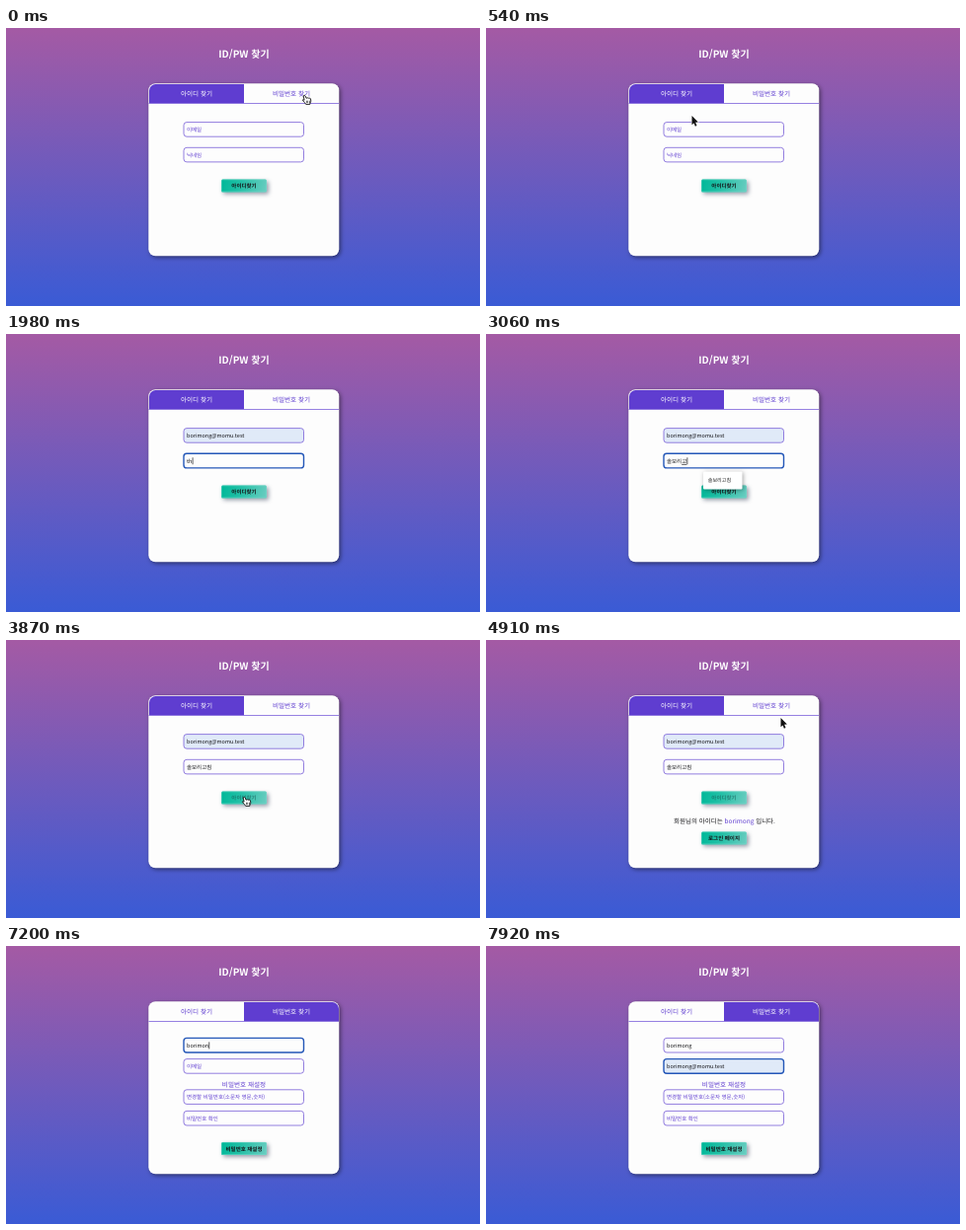
Recreate the animation shown at these times as an HTML page with a canvas. Size 480x282 px, loop 8000 ms.

```html
<!DOCTYPE html>
<html lang="ko">
<head>
<meta charset="utf-8">
<title>ID/PW 찾기</title>
<style>
  html, body { margin: 0; width: 100%; height: 100%; overflow: hidden; }
  canvas { display: block; width: 480px; height: 282px; }
</style>
</head>
<body>
<canvas id="stage"></canvas>
<script>
const W = 480, H = 282, LOOP = 8000;
const PURPLE = '#5f3dd0', INK = '#151518', BLUE = '#2457b8', FILLED = '#e0eaf8';
const ID = 'borimong', EMAIL = ID + '@momu.test', NICK = '솔보리고침';

const canvas = document.getElementById('stage');
const ctx = canvas.getContext('2d');
const scale = window.devicePixelRatio || 1;
canvas.width = W * scale;
canvas.height = H * scale;

// Each track is a list of [time, value] pairs; the value holds until the next time.
const emailTrack = [[0, ''], [1020, 'b'], [1120, 'bo'], [1220, 'bor'], [1500, EMAIL]];
const nickTrack = [[0, ''], [1800, 't'], [1920, 'th'], [2300, 't'], [2400, ''],
  [2520, 'ㅅ'], [2600, '소'], [2680, '솔'], [2760, '솔ㅂ'], [2820, '솔보'],
  [2900, '솔보리'], [2980, '솔보리ㄱ'], [3040, '솔보리고'], [3150, '솔보리고치'], [3240, NICK]];
const idTrack = [[0, ''], [6120, 'ㅠ'], [6280, 'ㅠㅐ'], [6580, 'ㅠ'], [6660, ''],
  ...[...ID].map((_, i) => [6760 + i * 70, ID.slice(0, i + 1)])];
const resetEmailTrack = [[0, ''], [7560, 'b'], [7640, 'bo'], [7780, EMAIL]];
const focusTrack = [[0, ''], [860, 'email'], [1680, 'nick'], [3840, ''],
  [5640, 'id'], [7400, 'resetEmail']];

// Pointer path: [time, x, y]
const path = [[50, 301, 68], [540, 208.5, 89], [780, 204, 102], [960, 204, 102],
  [3380, 215, 130], [3760, 240, 159], [4180, 240, 159], [4560, 338, 118],
  [4910, 298.5, 79], [5040, 291, 67], [5180, 291, 67], [5560, 214, 100], [5760, 214, 100]];

const between = (t, a, b) => t >= a && t < b;

function valueAt(track, t) {
  let value = track[0][1];
  for (const [start, v] of track) if (t >= start) value = v;
  return value;
}

function pointerAt(t) {
  if (t <= path[0][0]) return path[0].slice(1);
  for (let i = 1; i < path.length; i++) {
    const [t0, x0, y0] = path[i - 1], [t1, x1, y1] = path[i];
    if (t > t1) continue;
    const p = (t - t0) / (t1 - t0), e = p * p * (3 - 2 * p);
    return [x0 + (x1 - x0) * e, y0 + (y1 - y0) * e];
  }
  return path[path.length - 1].slice(1);
}

function text(str, x, y, size, color = INK, weight = 500, align = 'left') {
  ctx.font = `${weight} ${size}px "Noto Sans CJK KR", "Noto Sans CJK JP", "Noto Sans", sans-serif`;
  ctx.textAlign = align;
  ctx.fillStyle = color;
  ctx.fillText(str, x, y + size * 0.37);
  return ctx.measureText(str).width;
}

function box(x, y, w, h, r, fill, stroke, lineWidth = 1) {
  ctx.beginPath();
  ctx.roundRect(x, y, w, h, r);
  if (fill) { ctx.fillStyle = fill; ctx.fill(); }
  if (stroke) { ctx.strokeStyle = stroke; ctx.lineWidth = lineWidth; ctx.stroke(); }
}

function withShadow(color, blur, offset, draw) {
  ctx.save();
  ctx.shadowColor = color;
  ctx.shadowBlur = blur * scale;
  ctx.shadowOffsetX = ctx.shadowOffsetY = offset * scale;
  draw();
  ctx.restore();
}

function field(y, placeholder, value = '', focused = false, t = 0) {
  const filled = value === EMAIL;
  box(180, y, 121.5, 14.6, 3, filled ? FILLED : '#fdfdfd',
    focused ? BLUE : '#8770dc', focused ? 1.4 : 0.9);
  const mid = y + 7.6;
  if (!value) text(placeholder, 183, mid, 5.5, PURPLE);
  const width = value ? text(value, 183, mid, 5.5) : 0;
  if (!focused) return;
  ctx.fillStyle = INK;
  if (!filled) ctx.fillRect(183.3 + width, mid - 3.6, 0.7, 7);
  // Underline below the syllable being composed
  if (/[^\x00-\x7f]$/.test(value) && t !== 0) {
    const last = ctx.measureText(value.slice(-1)).width;
    ctx.fillRect(183 + width - last, mid + 3, last, 0.7);
  }
}

function button(label, y, color = INK) {
  const fill = ctx.createLinearGradient(219, y, 263, y + 13);
  fill.addColorStop(0, '#00b899');
  fill.addColorStop(0.4, '#20bfa5');
  fill.addColorStop(1, '#6accc0');
  withShadow('rgba(30,40,70,.45)', 4, 2, () => box(218, y, 46, 13, 1.5, fill));
  box(218.4, y + 0.4, 45.2, 12.2, 1.2, null, 'rgba(120,220,205,.65)', 0.8);
  text(label, 241, y + 6.6, 5.5, color, 600, 'center');
}

function popup(label, y) {
  withShadow('rgba(0,0,0,.35)', 4, 1, () => box(220, y, 39.5, 18, 1, '#fff'));
  ctx.save();
  ctx.beginPath();
  ctx.rect(220, y, 39.5, 18);
  ctx.clip();
  text(label, 224.7, y + 9, 5.1, '#222', 400);
  ctx.restore();
}

function tab(label, x, active, corners) {
  box(x, 57, 96, 19.3, corners, active ? PURPLE : '#fdfdfd');
  text(label, x + 48, 67, 6.6, active ? '#fff' : PURPLE, 500, 'center');
}

function drawCard(resetting) {
  const sky = ctx.createLinearGradient(0, 0, 0, H);
  sky.addColorStop(0, '#a45aa4');
  sky.addColorStop(1, '#3a5bd5');
  ctx.fillStyle = sky;
  ctx.fillRect(0, 0, W, H);
  text('ID/PW 찾기', 241, 26.5, 10, '#fff', 700, 'center');
  withShadow('rgba(0,0,0,.5)', 4, 1.5, () => box(144.3, 56.3, 193, 175, 7, '#fdfdfd'));
  tab('아이디 찾기', 145, !resetting, [6.5, 0, 0, 0]);
  tab('비밀번호 찾기', 241, resetting, [0, 6.5, 0, 0]);
  ctx.fillStyle = '#7c62da';
  ctx.fillRect(144.5, 76, 192.5, 0.8);
}

function drawFindId(t, focus) {
  const done = t >= 3960;
  field(95.6, '이메일', valueAt(emailTrack, t), focus === 'email');
  field(121.3, '닉네임', valueAt(nickTrack, t), focus === 'nick', t < 3240 ? t : 0);
  button('아이디찾기', 153.4, t >= 3840 ? 'rgba(20,70,70,.5)' : INK);
  if (between(t, 1020, 1500)) popup(EMAIL, 113.5);
  if (between(t, 2680, 3340)) popup(NICK, 139.5);
  if (!done) return;
  const parts = [['회원님의 아이디는 ', INK], [ID, PURPLE], [' 입니다.', INK]];
  let x = 190;
  for (const [str, color] of parts) x += text(str, x, 183.3, 6.5, color);
  button('로그인 페이지', 194.4);
}

function drawReset(t, focus) {
  field(93.4, '아이디', valueAt(idTrack, t), focus === 'id', t);
  field(114.6, '이메일', valueAt(resetEmailTrack, t), focus === 'resetEmail');
  text('비밀번호 재설정', 241, 141, 6.6, PURPLE, 500, 'center');
  field(145.8, '변경할 비밀번호(소문자 영문,숫자)');
  field(167.4, '비밀번호 확인');
  button('비밀번호 재설정', 198.9);
  if (between(t, 7560, 7780)) popup(EMAIL, 132);
}

function polygon(points) {
  ctx.beginPath();
  points.forEach(([x, y]) => ctx.lineTo(x, y));
  ctx.closePath();
}

function drawPointer(t) {
  if (!(t < 1000 || between(t, 3380, 5800))) return;
  const [x, y] = pointerAt(t);
  const overTab = y > 57 && y < 76 && x > 241;
  const overButton = y > 153 && y < 167 && x > 218 && x < 264;
  const overField = x > 180 && x < 301 && (t < 5100
    ? between(y, 95.6, 110) || between(y, 121, 136)
    : between(y, 93.4, 108));
  ctx.save();
  ctx.translate(x, y);
  ctx.lineJoin = 'round';
  if (overField) {
    ctx.fillStyle = INK;
    ctx.fillRect(-0.4, -4, 0.8, 8);
    ctx.fillRect(-1.6, -4.3, 3.2, 0.7);
    ctx.fillRect(-1.6, 3.6, 3.2, 0.7);
  } else if (overTab || overButton && t < 3960) {
    polygon([[0.2, 0.8], [1.2, 0.2], [2.2, 1], [3, 3.2], [4.4, 2.8], [5.4, 3.2],
      [6.6, 3], [7.5, 4], [7.8, 6.2], [7, 8], [6.8, 9.4], [2.7, 9.4],
      [1.5, 7.6], [-0.6, 5.6], [-0.3, 4.7], [1.1, 5.2]]);
    ctx.fillStyle = '#fff';
    ctx.strokeStyle = '#111';
    ctx.lineWidth = 0.9;
    ctx.fill();
    ctx.stroke();
    ctx.fillStyle = '#111';
    for (const dx of [3, 4.5, 6]) ctx.fillRect(dx, 5.7, 0.6, 2.4);
  } else {
    polygon([[0, 0], [0, 9.2], [2, 7.4], [3.4, 10.7], [5, 10], [3.6, 6.8], [6.4, 6.6]]);
    ctx.strokeStyle = '#fff';
    ctx.lineWidth = 1.2;
    ctx.stroke();
    ctx.fillStyle = '#111';
    ctx.fill();
  }
  ctx.restore();
}

function draw(now) {
  const t = now % LOOP;
  const resetting = t >= 5120;
  const focus = valueAt(focusTrack, t);
  ctx.setTransform(scale, 0, 0, scale, 0, 0);
  ctx.textRendering = 'geometricPrecision';
  drawCard(resetting);
  (resetting ? drawReset : drawFindId)(t, focus);
  drawPointer(t);
  requestAnimationFrame(draw);
}
requestAnimationFrame(draw);
</script>
</body>
</html>
```
